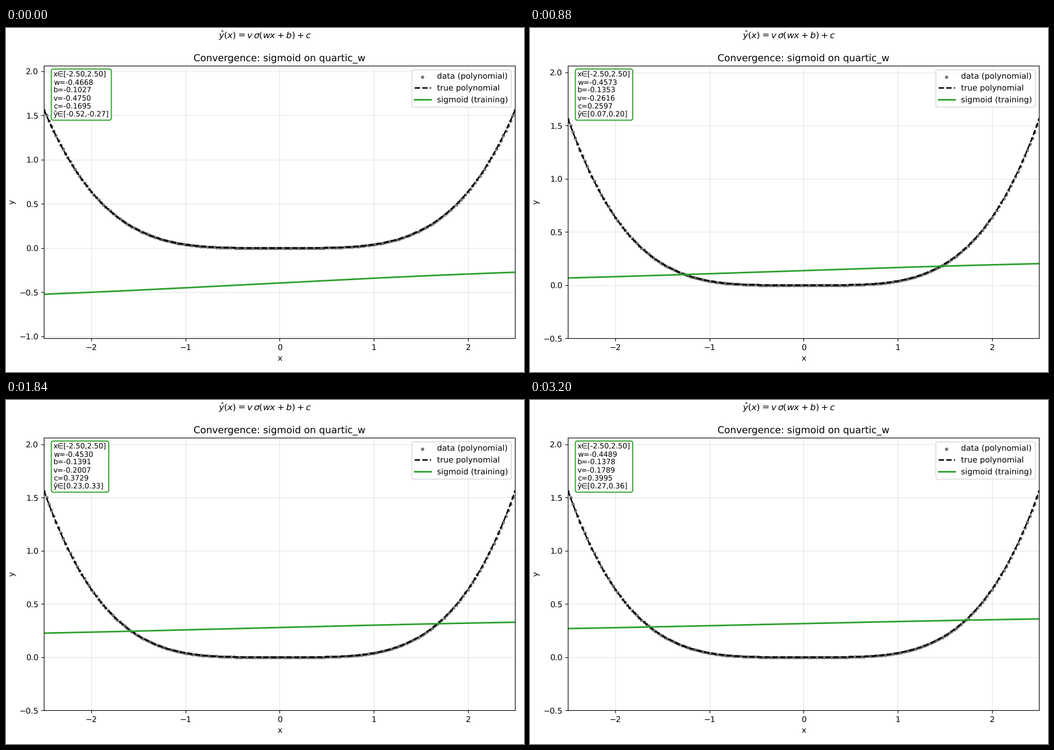
A matplotlib script that plays this animation: 917 px wide and 611 px high, repeating every 3.28 s.

```python
import numpy as np
import matplotlib.pyplot as plt
from matplotlib.animation import FuncAnimation
from matplotlib.ticker import MultipleLocator

plt.rcParams["font.family"] = "DejaVu Sans"
plt.rcParams["text.hinting"] = "none"

W, H, DPI = 917, 611, 101.9
FRAMES, INTERVAL = 41, 80
STEPS, RATE = 25, 0.002
GREEN = "#2ca02c"

x = np.linspace(-2.5, 2.5, 200)
y = 0.04 * x**4


def sigmoid(z):
    return 1 / (1 + np.exp(-z))


def predict(p):
    w, b, v, c = p
    return v * sigmoid(w * x + b) + c


def gradient(p):
    """Gradient of the mean squared error."""
    w, b, v, c = p
    s = sigmoid(w * x + b)
    err = 2 * (v * s + c - y)
    inner = err * v * s * (1 - s)
    return np.array([np.mean(inner * x), np.mean(inner),
                     np.mean(err * s), np.mean(err)])


def train(p):
    history = [p]
    for _ in range(FRAMES - 1):
        for _ in range(STEPS):
            p = p - RATE * gradient(p)
        history.append(p)
    return history


history = train(np.array([-0.4668, -0.1027, -0.4750, -0.1695]))

# The tiny margin keeps the pixel size from being truncated.
fig = plt.figure(figsize=((W + 1e-6) / DPI, (H + 1e-6) / DPI), dpi=DPI)
left, right, top, bottom = 67.4, 901.4, 67, 551.4
ax = fig.add_axes([left / W, 1 - bottom / H,
                   (right - left) / W, (bottom - top) / H])

fig.text(0.5, 1 - 18 / H, r"$\hat{y}(x) = v\,\sigma(wx+b) + c$",
         ha="center", va="baseline", fontsize=11)
ax.set_title("Convergence: sigmoid on quartic_w")
ax.set_xlabel("x")
ax.set_ylabel("y")
ax.set_xlim(-2.5, 2.5)
ax.xaxis.set_major_locator(MultipleLocator(1))
ax.yaxis.set_major_locator(MultipleLocator(0.5))
ax.grid(alpha=0.3)

ax.scatter(x, y, s=10, color="k", alpha=0.45, label="data (polynomial)")
ax.plot(x, y, "k--", lw=1.8, label="true polynomial")
fit, = ax.plot(x, predict(history[0]), color=GREEN, lw=2,
               label="sigmoid (training)")
ax.legend(loc="upper right")
info = ax.text(0.02, 0.98, "", transform=ax.transAxes, va="top", fontsize=9,
               linespacing=1.145,
               bbox=dict(boxstyle="round,pad=0.3", facecolor="white",
                         edgecolor=GREEN, lw=1.5, alpha=0.9))


def update(i):
    p = history[i]
    out = predict(p)
    fit.set_ydata(out)
    ax.set_ylim(min(0, out.min()) - 0.5, y.max() + 0.5)
    lines = [f"x∈[{x.min():.2f},{x.max():.2f}]"]
    lines += [f"{name}={value:.4f}" for name, value in zip("wbvc", p)]
    lines.append(f"ŷ∈[{out.min():.2f},{out.max():.2f}]")
    info.set_text("\n".join(lines))
    return fit, info


anim = FuncAnimation(fig, update, frames=FRAMES, interval=INTERVAL,
                     repeat=True, repeat_delay=0)
plt.show()
```
